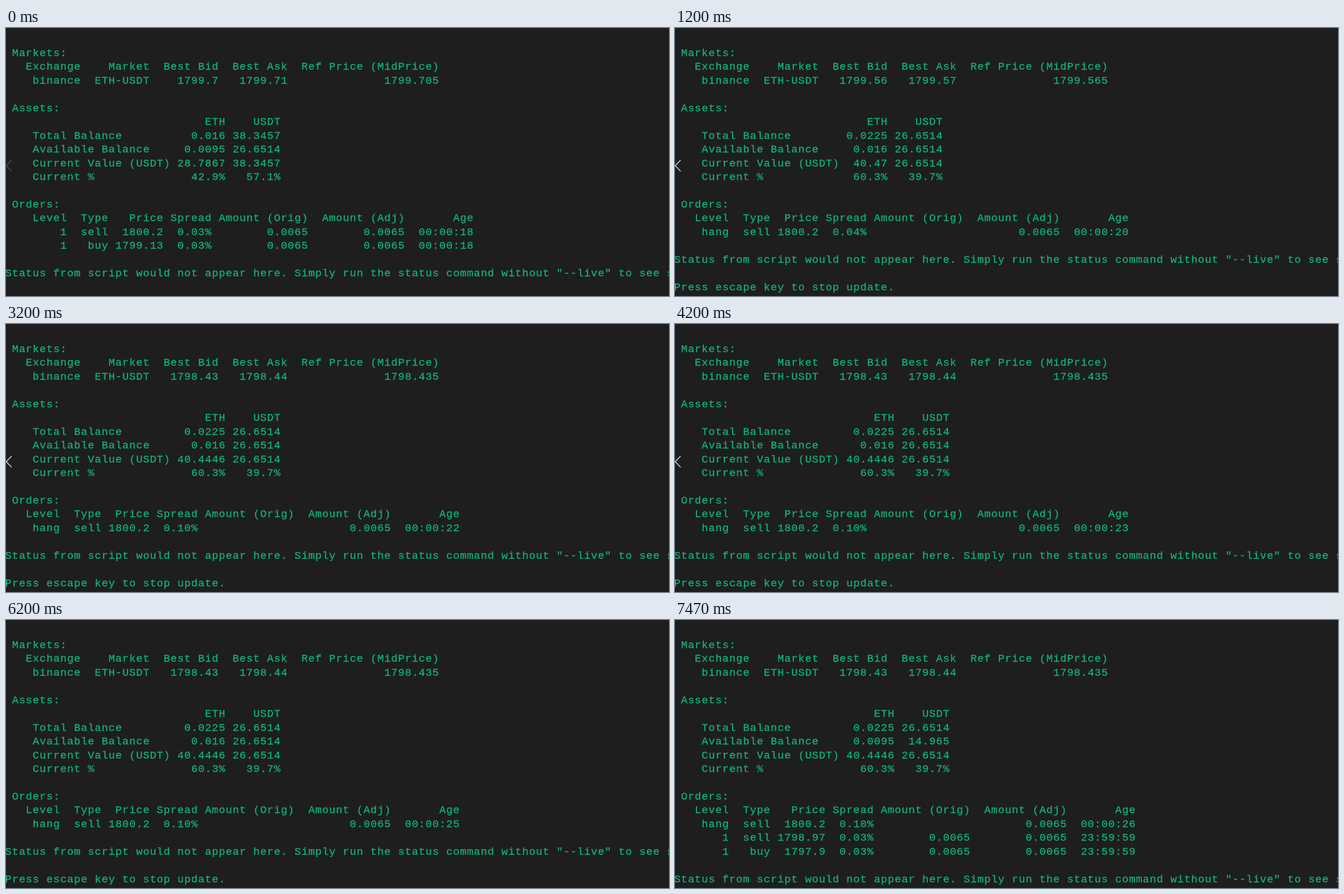
Write an HTML page that moves like this. It is 1177x476 px and loops after 8 s.

```html
<!DOCTYPE html>
<html lang="en">
<head>
<meta charset="utf-8">
<title>Live status</title>
<style>
  html, body { margin: 0; width: 100%; height: 100%; overflow: hidden; background: #1e1e1e; }
  main { position: fixed; inset: 0; overflow: hidden; contain: strict; }
  pre {
    position: absolute; left: -1.6px; top: 32.8px; margin: 0;
    font: 19px/24.47px "Liberation Mono", "Courier New", monospace;
    letter-spacing: .835px; font-variant-ligatures: none;
    color: #0fb576; -webkit-text-stroke: .3px #0fb576;
  }
  svg {
    position: absolute; left: 0; top: 233px; width: 12px; height: 23px;
    fill: none; stroke: #e8e8e8; stroke-width: 1.3;
    animation: fade 8s linear infinite;
  }
  @keyframes fade {
    0% { opacity: .25; }
    5.875%, 55% { opacity: 1; }
    64.2%, 100% { opacity: 0; }
  }
</style>
</head>
<body>
<main>
  <pre id="screen"></pre>
  <svg viewBox="0 0 12 23"><path d="M10 1.5L.5 11.5L10 21.5"/></svg>
</main>
<script>
const LOOP = 8000;
const output = document.getElementById('screen');

// Places each cell so that it ends at the matching column.
const row = (ends, cells) =>
  cells.reduce((line, cell, i) => line + cell.padStart(ends[i] - line.length), '');

const HEAD = ['Level', 'Type', 'Price', 'Spread', 'Amount (Orig)', 'Amount (Adj)', 'Age'];
const LABELS = ['', 'Total Balance', 'Available Balance', 'Current Value (USDT)', 'Current %'];
const COINS = ['ETH', 'USDT'];
const wide = [32, 40], narrow = [31, 39];
const SIZE = '0.0065';

const before = {
  market: ['1799.7', '1799.71', '1799.705'],
  assets: [COINS, ['0.016', '38.3457'], ['0.0095', '26.6514'], ['28.7867', '38.3457'], ['42.9%', '57.1%']],
  assetEnds: i => wide,
  orderEnds: [9, 15, 23, 30, 44, 58, 68],
  orders: age => [
    ['1', 'sell', '1800.2', '0.03%', SIZE, SIZE, age],
    ['1', 'buy', '1799.13', '0.03%', SIZE, SIZE, age]
  ]
};
const hanging = spread => age => [['hang', 'sell', '1800.2', spread, '', SIZE, age]];
const filled = {
  market: ['1799.56', '1799.57', '1799.565'],
  assets: [COINS, ['0.0225', '26.6514'], ['0.016', '26.6514'], ['40.47', '26.6514'], ['60.3%', '39.7%']],
  assetEnds: i => narrow,
  orderEnds: [8, 14, 21, 28, 42, 56, 66],
  orders: hanging('0.04%')
};
// Only the upper part of the screen is redrawn at first.
const partial = {
  ...filled,
  market: ['1798.31', '1798.44', '1798.375'],
  assetEnds: i => i < 3 ? wide : narrow
};
const dropped = {
  ...partial,
  assets: filled.assets.map((a, i) => i === 3 ? ['40.4446', '26.6514'] : a),
  assetEnds: i => wide,
  orders: hanging('0.10%')
};
const settled = { ...dropped, market: ['1798.43', '1798.44', '1798.435'] };
const renewed = {
  ...settled,
  assets: settled.assets.map((a, i) => i === 2 ? ['0.0095', '14.965'] : a),
  orderEnds: [8, 14, 22, 29, 43, 57, 67],
  orders: age => [
    ...hanging('0.10%')(age),
    ['1', 'sell', '1798.97', '0.03%', SIZE, SIZE, '23:59:59'],
    ['1', 'buy', '1797.9', '0.03%', SIZE, SIZE, '23:59:59']
  ]
};

const timeline = [
  [0, before], [1200, filled], [2130, partial],
  [2200, dropped], [3200, settled], [7200, renewed]
];

function render(state, age) {
  return [
    ' Markets:',
    '   Exchange    Market  Best Bid  Best Ask  Ref Price (MidPrice)',
    row([11, 21, 31, 41, 63], ['binance', 'ETH-USDT', ...state.market]),
    '',
    ' Assets:',
    ...state.assets.map((pair, i) => {
      const label = '    ' + LABELS[i];
      return row([label.length, ...state.assetEnds(i)], [label, ...pair]);
    }),
    '',
    ' Orders:',
    ...[HEAD, ...state.orders(age)].map(cells => row(state.orderEnds, cells)),
    '',
    'Status from script would not appear here. Simply run the status command without "--live" to see s',
    '',
    'Press escape key to stop update.'
  ].join('\n');
}

let shown = '';
function tick() {
  const t = performance.now() % LOOP;
  const state = timeline.filter(([start]) => start <= t).pop()[1];
  const seconds = 18 + Math.floor((t + 800) / 1000);
  const text = render(state, '00:00:' + seconds);
  if (text !== shown) output.textContent = shown = text;
  requestAnimationFrame(tick);
}
tick();
</script>
</body>
</html>
```
